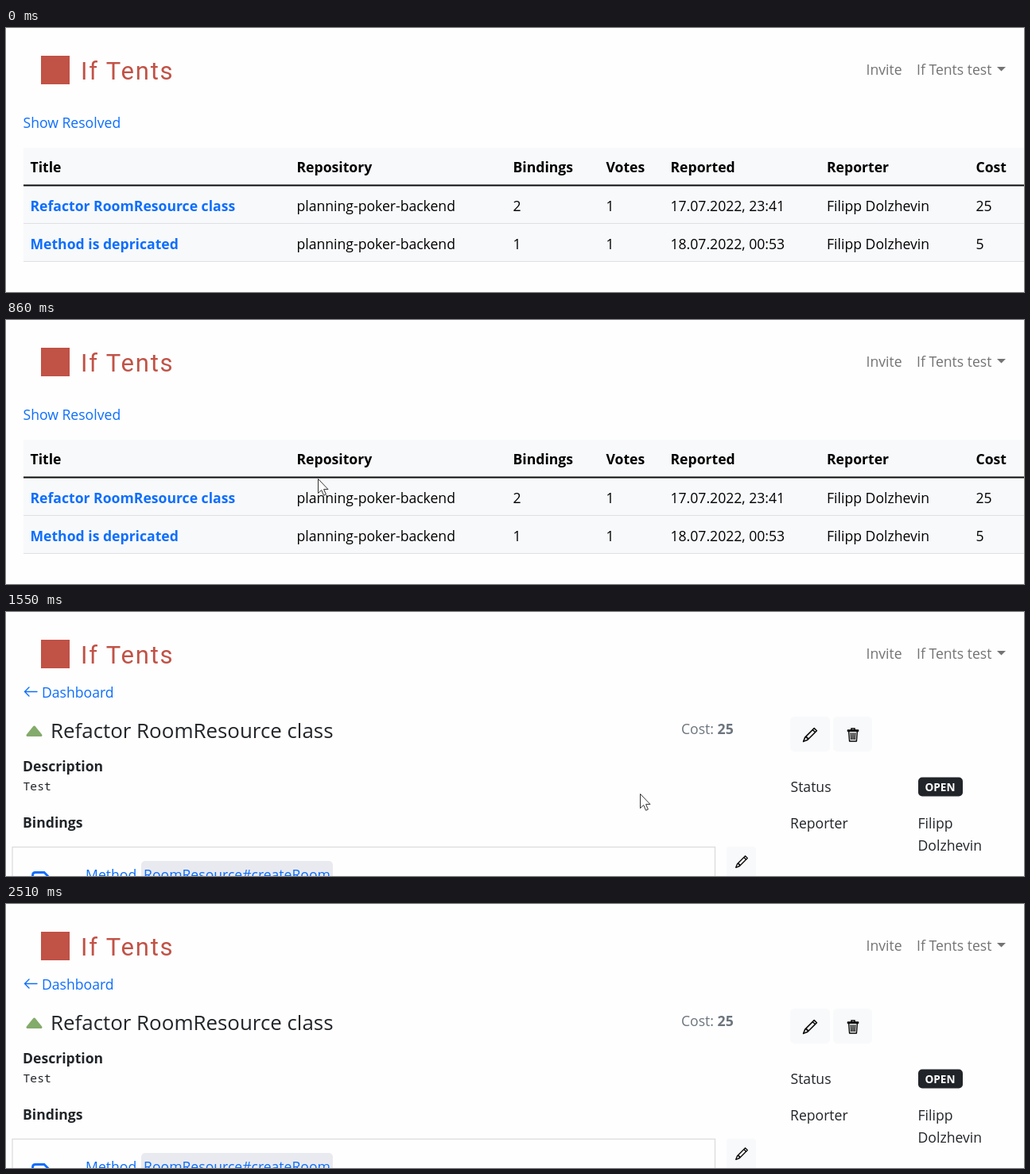
An HTML page that plays this animation: 1280 px wide and 333 px high, repeating every 2710 ms.

```html
<!DOCTYPE html>
<html lang="en">
<head>
<meta charset="utf-8">
<title>Issue list</title>
<style>
  html, body { margin: 0; width: 100%; height: 100%; overflow: hidden; background: #fefefe; }
  svg { display: block; width: 1280px; height: 333px; font: 17.6px "Open Sans", "Noto Sans", sans-serif; }
  text { white-space: pre; }
  .b { font-weight: 700; }
  .link { fill: #0d6efd; }
  .nav { fill: #737373; }
  .ink { fill: #212529; }
  .muted { fill: #6c757d; }
  .white { fill: #fff; }
  .icon { fill: none; stroke: #0a0a0a; stroke-width: 1.35; stroke-linejoin: round; }
  .pointer { fill: #fff; stroke: #333; stroke-width: 1; stroke-linejoin: round; }
</style>
</head>
<body>
<svg id="stage" viewBox="0 0 1280 333"></svg>
<script>
const LOOP = 2710;
const REPORTER = ["Filipp", "Dolzhevin"];

const text = (x, y, str, cls = "", attrs = "") =>
  `<text x="${x}" y="${y}" class="${cls}" ${attrs}>${str}</text>`;
const box = (x, y, w, h, fill, r = 0) =>
  `<rect x="${x}" y="${y}" width="${w}" height="${h}" rx="${r}" fill="${fill}"/>`;
const icon = (cx, cy, scale, d) =>
  `<path class="icon" transform="translate(${cx} ${cy}) scale(${scale}) translate(-8 -8)" d="${d}"/>`;

const PENCIL = "M12.5.7l2.8 2.8-10 10-4.6 1.8 1.8-4.6zM10.8 2.4l2.8 2.8M3 10.5h1.5v1h1v1.5";
const TRASH = "M2 2.500h12v1.200H2zM6 2V.8h4V2M3.200 4L4 15.300h8L12.800 4M5.700 5.500l.3 8M8 5.500v8M10.300 5.500l-.3 8";

const COLUMNS = [30.5, 365.5, 637.5, 754.5, 835.5, 1032, 1219.5];
const row = (y, cells, cls) =>
  cells.map((cell, i) => text(COLUMNS[i], y, cell, cls(i), i ? "" : `id="cell${y}"`)).join("");

const header = `
  ${box(44, 35, 36, 36, "#c15246")}
  ${text(94, 65, "If Tents", "", 'fill="#c15246" font-family="Roboto, sans-serif" font-size="31" letter-spacing="1.8"')}
  ${text(1081.5, 59, "Invite", "nav")}
  ${text(1145, 59, "If Tents test", "nav")}
  <path d="M1246 49h11l-5.500 5.500z" class="nav"/>`;

const repo = "planning-poker-backend";
const reporter = REPORTER.join(" ");
const issueCell = i => i ? "" : "b link";
const list = `
  ${text(21.5, 126, "Show Resolved", "link")}
  ${box(22, 151, 1258, 144, "#f8f9fb")}
  ${box(22, 197.5, 1258, 2, "#0a0a0a")}
  ${box(22, 246, 1258, 1, "#dee0e3")}
  ${box(22, 294, 1258, 1, "#dee0e3")}
  ${row(182, ["Title", "Repository", "Bindings", "Votes", "Reported", "Reporter", "Cost"], () => "b")}
  ${row(231, ["Refactor RoomResource class", repo, 2, 1, "17.07.2022, 23:41", reporter, 25], issueCell)}
  ${row(278.5, ["Method is depricated", repo, 1, 1, "18.07.2022, 00:53", reporter, 5], issueCell)}
  <g clip-path="url(#picked)">${box(1219, 211, 22, 25, "#0078d7")}${text(1219.5, 231, "25", "white")}</g>`;

const cost = cls => text(849, 154, 'Cost: <tspan class="b">25</tspan>', cls);
const detail = `
  <path d="M39 100.500H23.500M29 95l-5.500 5.500 5.500 5.500" fill="none" stroke="#0d6efd" stroke-width="1.400" stroke-linecap="round"/>
  ${text(45, 107.5, "Dashboard", "link")}
  <path d="M27 155.500L35.500 145l8.500 10.500z" fill="#83ab6b" stroke="#83ab6b" stroke-width="3" stroke-linejoin="round"/>
  ${text(56, 159, "Refactor RoomResource class", "ink", 'font-size="25.9"')}
  ${cost("muted")}
  <g clip-path="url(#picked)">${box(880, 134, 40, 25, "#0078d7")}${cost("white")}</g>
  ${text(21, 201, "Description", "b ink")}
  ${text(21.5, 224.5, "Test", "ink", 'font-family="Noto Sans Mono, monospace" font-size="14.7"')}
  ${text(21, 272, "Bindings", "b ink")}
  <rect x="8" y="296.500" width="883.500" height="60" fill="none" stroke="#dcdcdc" stroke-width="1.300"/>
  <path d="M33.500 340v-8q0-3.500 3.500-3.500h11l7 7" fill="none" stroke="#0d6efd" stroke-width="2.800"/>
  ${text(100, 337.5, "Method", "link")}
  ${box(170, 314, 241, 30, "#e9eaef", 5)}
  ${text(173, 337.5, "RoomResource#createRoom", "link")}
  ${box(906, 296, 37, 42, "#f8f9fa", 4)}
  ${icon(925, 315, 1, PENCIL)}
  ${box(986, 132, 50, 44, "#f8f9fa", 5)}
  ${icon(1011, 155, 1.15, PENCIL)}
  ${box(1040, 132, 49, 44, "#f8f9fa", 5)}
  ${icon(1065, 155, 1.1, TRASH)}
  ${text(986.5, 226.5, "Status", "ink")}
  ${box(1147, 208.5, 56, 24, "#212529", 5)}
  ${text(1155.5, 226, "OPEN", "b white", 'font-size="13.6"')}
  ${text(986, 273, "Reporter", "ink")}
  ${text(1146.5, 273, REPORTER[0], "ink")}
  ${text(1146.5, 301, REPORTER[1], "ink")}`;

const $ = id => document.getElementById(id);
$("stage").innerHTML = `
  <clipPath id="picked"><rect id="range" height="333"/></clipPath>
  ${box(0, 0, 1280, 333, "#fefefe")}
  ${header}
  <g id="list">${list}</g>
  <g id="detail">${detail}</g>
  <path id="beam" d="M-4-9h3l1 1 1-1h3M0-8V8M-4 9h3l1-1 1 1h3" fill="none" stroke="#fff" stroke-width="1.400" style="mix-blend-mode:difference"/>
  <circle id="press" r="14.5" fill="#fde95c" style="mix-blend-mode:multiply"/>
  <path id="arrow" class="pointer" d="M.5.5V18.500l4.200-3.900 2.800 6.600 2.900-1.200-2.800-6.400H13z"/>
  <path id="hand" class="pointer" d="M-2 2q0-2 2-2t2 2v7q0-2 2-1.800 1.800.200 1.800 2 .300-1.500 2-1.200 1.700.300 1.700 2 .300-1.200 1.700-.900 1.600.400 1.600 2.400v5q0 6.500-6.500 6.500h-2.500q-3.300 0-5.300-3.500l-5-7.500q-1-2 .500-2.500 1.500-.500 3 1.500l1 1z"/>`;

// Pointer path: time, x, y
const PATH = [
  [120, 1224, 322], [280, 1216, 221], [320, 1216, 221], [460, 1244, 219], [600, 1240, 221],
  [700, 1080, 250], [780, 700, 257], [860, 392, 200], [920, 340, 199], [1050, 273, 227],
  [1370, 273, 227], [1550, 797, 229], [1690, 920, 148], [1750, 920, 148], [1830, 888, 148],
  [1970, 888, 148], [2050, 928, 150], [2190, 928, 150], [2490, 997, 276], [2510, 997, 276]
];
const HOLDS = [[460, 600]];
const PRESSES = [[300, 600], [1250, 1350], [1730, 1970], [2070, 2130]];
const PAGE_TURN = 1350;

const within = (v, a, b) => v >= a && v < b;

function pointerAt(t) {
  const hold = HOLDS.find(([a, b]) => within(t, a, b));
  const time = hold ? hold[0] : t;
  const i = PATH.findIndex(key => key[0] > time);
  if (i < 1) return null;
  const [t0, x0, y0] = PATH[i - 1], [t1, x1, y1] = PATH[i];
  const k = (time - t0) / (t1 - t0);
  return { x: x0 + (x1 - x0) * k, y: y0 + (y1 - y0) * k };
}

function selectionAt(t, x) {
  if (within(t, 320, 640)) {
    const end = t >= 460 || x > 1235 ? 1240 : x > 1225 ? 1230 : 1220;
    return [1219.5, end];
  }
  if (within(t, 1770, 2070)) {
    const start = t >= 1830 || x < 891 ? 886 : x < 900 ? 895 : x < 911 ? 905 : 916;
    return [start, 916];
  }
  return [0, 0];
}

function show(id, visible, p) {
  $(id).style.display = visible ? "" : "none";
  if (visible && p) $(id).setAttribute("transform", `translate(${p.x} ${p.y})`);
}

function draw(time) {
  // The pointer advances in 20 ms steps, shifted by 10 ms after the first hover
  const t = time < 1050 ? Math.floor(time / 20) * 20 : Math.floor((time + 10) / 20) * 20 - 10;
  const p = pointerAt(t);
  const onList = t < PAGE_TURN;
  const hover = !!p && onList && within(p.x, 30, 287) && within(p.y, 213, 239);
  const overText = !!p && (onList
    ? within(p.x, 1219, 1240) && within(p.y, 212, 238)
    : within(p.x, 849, 917) && within(p.y, 135, 160));

  show("list", onList);
  show("detail", !onList);
  $("cell231").style.fill = hover ? "#0a58ca" : "";

  const [from, to] = selectionAt(t, p ? p.x : 0);
  $("range").setAttribute("x", from);
  $("range").setAttribute("width", to - from);

  show("press", !!p && PRESSES.some(([a, b]) => within(t, a, b)), p);
  show("hand", hover, p);
  show("beam", overText, p);
  show("arrow", !!p && !hover && !overText, p);
}

const start = performance.now();
function tick() {
  draw((performance.now() - start) % LOOP);
  requestAnimationFrame(tick);
}
tick();
</script>
</body>
</html>
```
